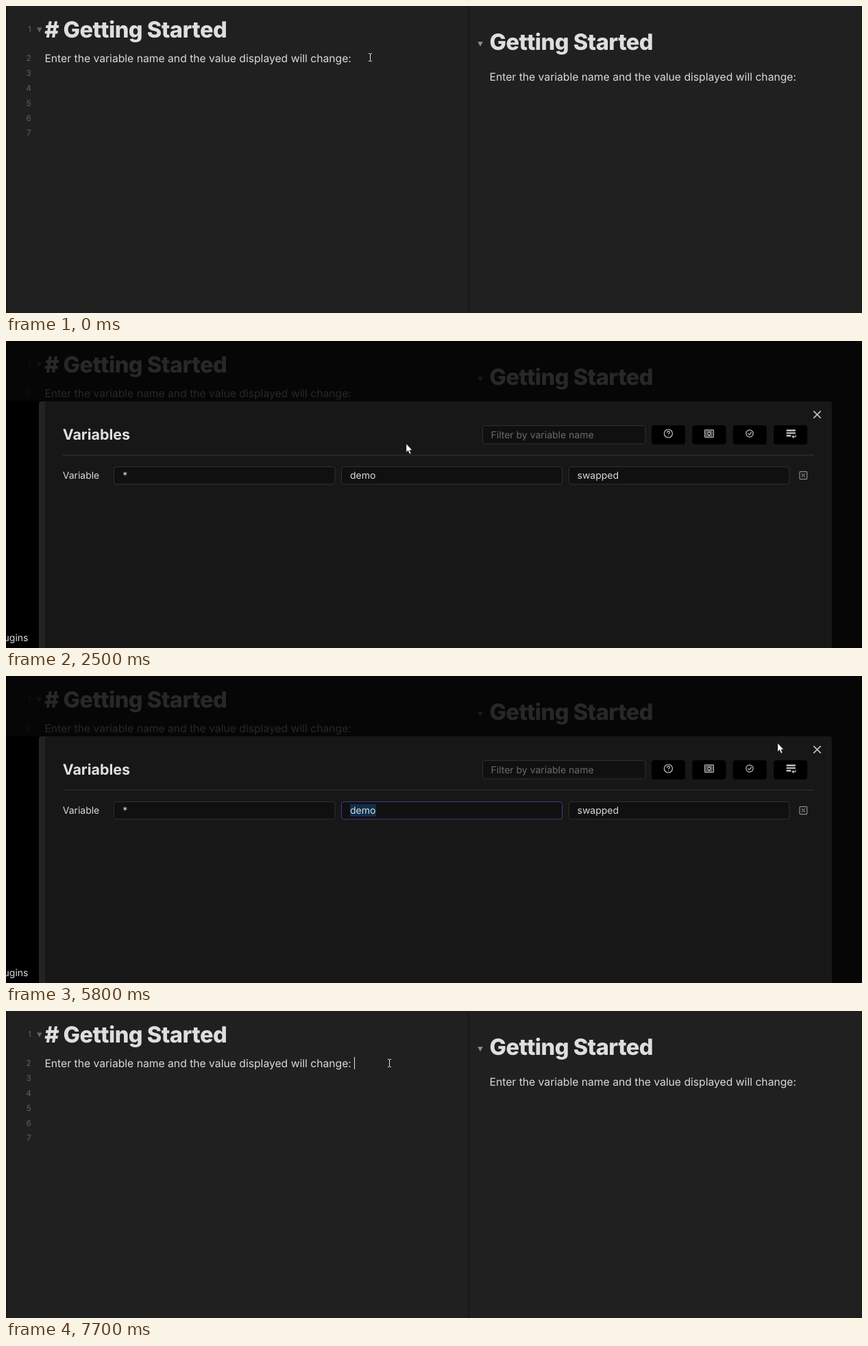
Write an HTML page that moves like this. It is 1249 by 448 pixels and loops after 8 s.

```html
<!DOCTYPE html>
<html lang="en">
<head>
<meta charset="utf-8">
<title>Variable editor</title>
<style>
  html, body { margin: 0; width: 100%; height: 100%; overflow: hidden; background: #202020; }
  svg { display: block; }
  text {
    font-family: Inter, sans-serif;
    font-size: 14px;
    font-optical-sizing: none;
    text-rendering: geometricPrecision;
    fill: #dadada;
    white-space: pre;
  }
  .h1 { font-size: 32.5px; font-weight: 800; letter-spacing: -.015em; fill: #dedede; }
  .h2 { font-size: 21.45px; font-weight: 700; fill: #e0e0e0; }
  .body { font-size: 15.69px; }
  .num { font-size: 11.8px; fill: #626262; text-anchor: end; }
  .hint { fill: #6a6a6a; }
  .end { text-anchor: end; }
  .field { fill: #101010; stroke: #303030; }
  .focused { stroke: #43378e; }
  .icon { fill: none; stroke: #c4c4c4; stroke-width: 1.2; stroke-linecap: round; stroke-linejoin: round; }
</style>
</head>
<body>
<svg id="stage" width="1249" height="448" viewBox="0 0 1249 448">
  <rect width="1249" height="448" fill="#202020"/>
  <path d="M0 0H3.5V448H0ZM673.5 0H676.5V448H673.5ZM1248 0H1249V448H1248Z" fill="#1a1a1a"/>

  <g id="numbers"></g>
  <path d="M45 31.5H52.4L48.7 38.5Z" fill="#646464"/>
  <path d="M688.3 52.3H695.7L692 59Z" fill="#929292"/>
  <text class="h1" x="56.2" y="46"># Getting Started</text>
  <text class="h1" x="705.5" y="64">Getting Started</text>
  <text class="body" x="56.4" y="82">Enter the variable name and the value displayed will change:</text>
  <text class="body" x="705.5" y="109">Enter the variable name and the value displayed will change:</text>
  <rect id="editorCaret" x="508" y="67" width="1" height="18" fill="#e4e4e4"/>

  <g id="modal">
    <rect width="1249" height="448" fill="#000" fill-opacity=".82"/>
    <rect y="87" width="57" height="361" fill="#000"/>
    <text class="end" x="32.5" y="438">plugins</text>
    <path d="M48 448V92Q48 88 52 88H57V448Z" fill="#232323"/>
    <path d="M57 448V88H1201Q1205 88 1205 92V448Z" fill="#171717"/>
    <path d="M1178.8 102.6L1188.4 112.2M1188.4 102.6L1178.8 112.2" stroke="#bdbdbd" stroke-width="1.7" stroke-linecap="round"/>

    <text class="h2" x="82.7" y="144.4">Variables</text>
    <rect class="field" x="695.5" y="123.5" width="237.5" height="26.5" rx="3.5"/>
    <text class="hint" x="707.5" y="142">Filter by variable name</text>
    <g id="buttons"></g>
    <g class="icon">
      <circle cx="966.4" cy="135" r="6"/>
      <path d="M964.5 133.5Q964.7 131.7 966.5 131.7Q968.4 131.8 968.4 133.3Q968.3 134.5 966.5 135.5M966.5 138V138.1"/>
      <rect x="1019.6" y="129.8" width="12.8" height="10.6" rx=".8"/>
      <rect x="1022" y="131.9" width="8" height="6.4" stroke-width=".8"/>
      <circle cx="1026" cy="135.1" r="2.2"/>
      <circle cx="1085" cy="135" r="5.2"/>
      <path d="M1082.8 135.2L1084.4 136.8L1087.4 133.5"/>
      <path d="M1139.7 130.5H1151M1139.7 134.4H1151M1139.7 138.3H1144.5" stroke-width="2.4"/>
      <path d="M1152 137.5V139.6H1147.3M1149 137.8L1147.2 139.6L1149 141.4"/>
    </g>
    <path d="M83 166.5H1179" stroke="#333"/>

    <text x="82.7" y="201">Variable</text>
    <rect class="field" x="157.5" y="183.5" width="322.5" height="25.5" rx="3.5"/>
    <rect id="nameField" class="field" x="489.5" y="183.5" width="322" height="25.5" rx="3.5"/>
    <rect class="field" x="821.5" y="183.5" width="321.5" height="25.5" rx="3.5"/>
    <rect id="selection" x="502" y="187" width="38" height="18" fill="#102e4a"/>
    <text x="170.3" y="201">*</text>
    <text x="502" y="201">demo</text>
    <text x="833.5" y="201">swapped</text>
    <rect id="fieldCaret" x="539" y="188" width="1" height="17" fill="#e4e4e4"/>
    <g class="icon" style="stroke:#8c8c8c">
      <rect x="1158" y="190.6" width="10.8" height="11" rx="1"/>
      <path d="M1161.2 193.9L1165.6 198.3M1165.6 193.9L1161.2 198.3"/>
    </g>
  </g>

  <path id="arrow" d="M0 0V12.4L2.8 9.8L4.8 14.8L6.9 13.9L4.9 9.2H8.6Z" fill="#fff" stroke="#111" stroke-width=".5"/>
  <g id="beam" fill="none">
    <path d="M-2.5 -5.5H2.5M-2.5 5.5H2.5M0 -5.5V5.5" stroke="#111" stroke-width="1.8"/>
    <path d="M-2.5 -5.5H-.7L0 -5L.7 -5.5H2.5M-2.5 5.5H-.7L0 5L.7 5.5H2.5M0 -5V5" stroke="#eee"/>
  </g>
</svg>
<script>
const LOOP = 8000;
const $ = id => document.getElementById(id);

function add(parent, tag, attrs, label = '') {
  const el = document.createElementNS('http://www.w3.org/2000/svg', tag);
  for (const key in attrs) el.setAttribute(key, attrs[key]);
  el.textContent = label;
  $(parent).append(el);
}

for (let n = 1; n <= 7; n++) {
  const y = n === 1 ? 37.8 : 80.4 + (n - 2) * 21.8;
  add('numbers', 'text', { class: 'num', x: 36.8, y }, n);
}
for (let i = 0; i < 4; i++) {
  add('buttons', 'rect', { x: 942 + i * 59.4, y: 123, width: 49, height: 28, rx: 4, fill: '#000' });
}

// Pointer stops: start time, shape, x, y
const POINTER = [
  [0, 'beam', 531, 75], [1000, 'arrow', 530, 74],
  [2300, 'arrow', 537, 84], [2400, 'arrow', 558, 114], [2500, 'arrow', 584, 150], [2600, 'arrow', 595, 169],
  [2800, 'arrow', 595, 171], [2900, 'arrow', 595, 175], [3000, 'arrow', 594, 178],
  [3300, 'beam', 591, 191], [3400, 'beam', 589, 196], [3500, 'beam', 589, 198],
  [4300, 'beam', 570, 202], [4400, 'arrow', 510, 220], [4500, 'arrow', 469, 231],
  [4600, 'arrow', 485, 233], [4700, 'arrow', 610, 220], [4800, 'arrow', 800, 178],
  [4900, 'arrow', 980, 138], [5000, 'arrow', 1080, 111], [5100, 'arrow', 1119, 98],
  [5200, 'arrow', 1120, 98], [5400, 'arrow', 1127, 96], [5700, 'arrow', 1126, 97], [5800, 'arrow', 1126, 98],
  [6500, 'beam', 1127, 100], [6600, 'beam', 1085, 98], [6700, 'beam', 950, 91],
  [6800, 'beam', 775, 83], [6900, 'beam', 640, 78], [7000, 'beam', 572, 76], [7100, 'beam', 559, 76]
];

const show = (id, on) => { $(id).style.display = on ? '' : 'none'; };

function draw(t) {
  const within = (from, to) => t >= from && t < to;
  show('modal', within(1100, 6500));
  show('editorCaret', within(500, 1100) || within(6600, 7100) || t >= 7700);
  show('fieldCaret', within(3500, 3800));
  show('selection', t >= 3800);
  $('nameField').classList.toggle('focused', t >= 3500);

  const [, shape, x, y] = POINTER.findLast(stop => stop[0] <= t);
  show('arrow', shape === 'arrow');
  show('beam', shape === 'beam');
  const offset = shape === 'beam' ? 0.5 : 0;
  $(shape).setAttribute('transform', `translate(${x + offset} ${y})`);
}

const start = performance.now();
function tick() {
  draw((performance.now() - start) % LOOP);
  requestAnimationFrame(tick);
}
draw(0);
requestAnimationFrame(tick);
</script>
</body>
</html>
```
